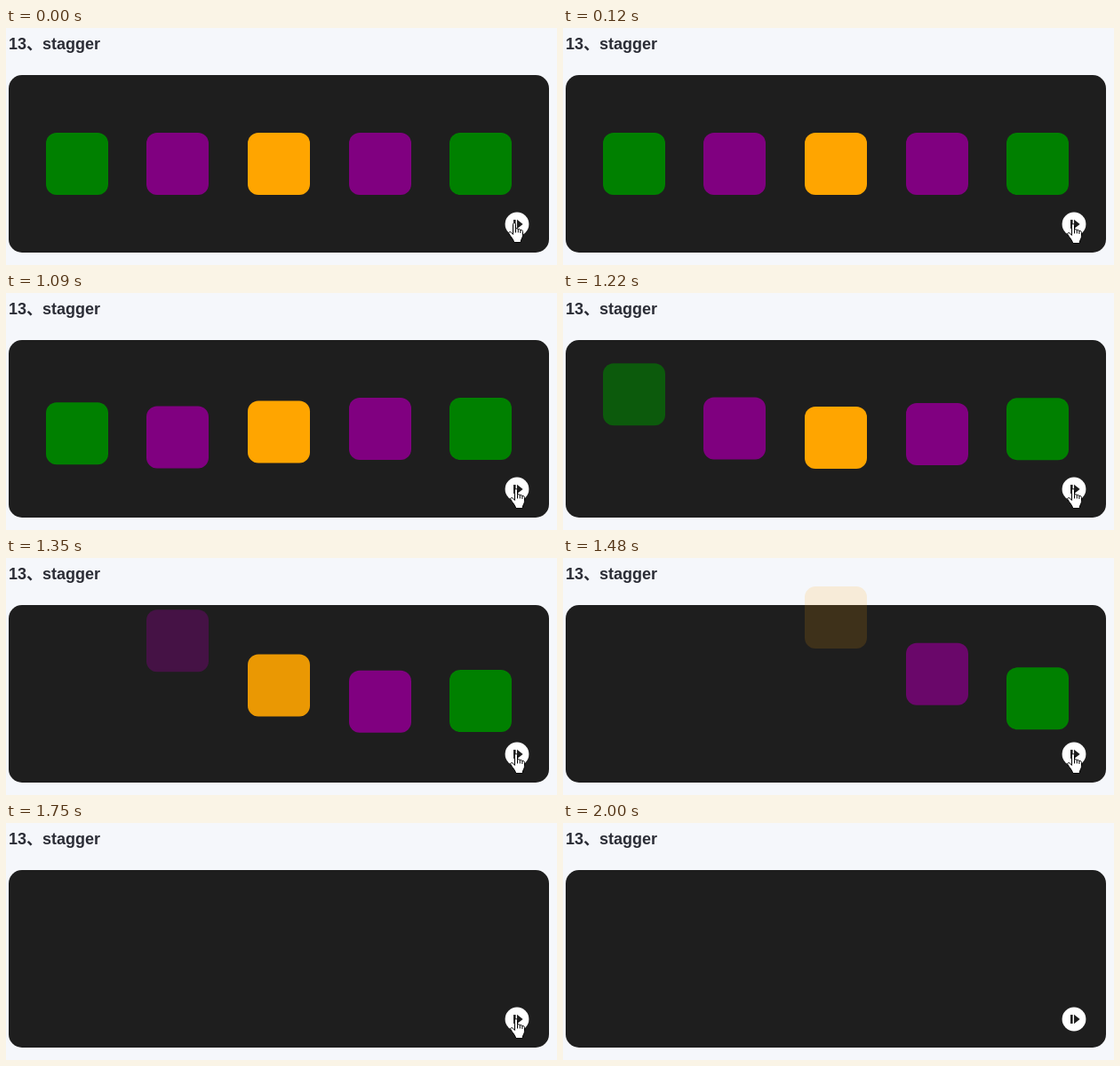
These frames come from a looping animation (620x267 px, 2680 ms). An HTML page:

```html
<!DOCTYPE html>
<html lang="en">
<head>
<meta charset="utf-8">
<title>stagger</title>
<style>
  html, body { margin: 0; width: 100%; height: 100%; overflow: hidden; background: #f5f7fb; }
  svg { display: block; }
  text { font: bold 18px "Liberation Sans", Arial, "Noto Sans CJK SC", "Noto Sans CJK", sans-serif; fill: #2b2d36; }
</style>
</head>
<body>
<svg width="620" height="267" viewBox="0 0 620 267">
  <rect width="620" height="267" fill="#f5f7fb"/>
  <text x="3" y="24">13、stagger</text>
  <rect x="3" y="53" width="608" height="200" rx="15" fill="#1e1e1e"/>
  <g id="boxes"></g>
  <g id="button">
    <circle cx="575" cy="221" r="13.4" fill="#fff"/>
    <path d="M571 216h2.6v10h-2.6zM575 215.8L581.6 221L575 226.2z" fill="#1e1e1e"/>
  </g>
  <g id="hand" stroke="#000" stroke-linejoin="round">
    <path fill="#fff" d="M5.5 13.5V2.2C5.5 .2 8.5 .2 8.5 2.2V7.5C8.9 6.3 11.1 6.5 11.3 8C11.9 7.1 13.7 7.4 13.9 9C14.5 8.2 16.5 8.5 16.5 10.5V14.5C16.5 17.5 14.4 18.5 14.2 22.5H6.7C6.3 19.5 3.2 16.5 .9 12.8C0 11 2.1 9.9 3.5 11.3Z"/>
    <path fill="none" d="M8.5 7.5V11.5M11.3 8V11.5M13.9 9V12"/>
  </g>
  <path id="arrow" d="M.5 .5V16.2L4.2 12.7L6.7 18.4L9 17.4L6.6 11.8H11.6Z" fill="#fff" stroke="#000"/>
</svg>
<script>
const LOOP = 2680;
const STEPS = [0, 120, 960, 1090, 1220, 1350, 1480, 1610, 1750, 1880, 2000];
const FIRST_MOVE = 2, LEAVE = 9;
const TICK = 400 / 3, LEAD = 151;          // sampled clock of the tween, ms
const DURATION = 500, STAGGER = 100, RISE = 100;
const COLORS = ["green", "purple", "orange", "purple", "green"];

const byId = id => document.getElementById(id);
const hand = byId("hand"), arrow = byId("arrow");

const boxes = COLORS.map((fill, i) => {
  const box = document.createElementNS("http://www.w3.org/2000/svg", "rect");
  const attrs = { x: Math.round(44.8 + 113.6 * i), y: 118, width: 70, height: 70, rx: 12, fill };
  for (const key in attrs) box.setAttribute(key, attrs[key]);
  return byId("boxes").appendChild(box);
});

const clamp = v => Math.min(1, Math.max(0, v));
const backIn = x => x * x * (2.70158 * x - 1.70158);

function place(el, x, y, shown) {
  el.setAttribute("transform", `translate(${x} ${y})`);
  el.setAttribute("visibility", shown ? "visible" : "hidden");
}

function render(ms) {
  const step = STEPS.filter(t => t <= ms).length - 1;
  const time = step < FIRST_MOVE ? 0 : LEAD + (step - FIRST_MOVE) * TICK;

  boxes.forEach((box, i) => {
    const p = backIn(clamp((time - i * STAGGER) / DURATION));
    box.setAttribute("y", 118 - RISE * p);
    box.setAttribute("opacity", clamp(1 - p));
  });

  place(hand, step ? 567 : 565, step ? 220 : 219, step < LEAVE);
  place(arrow, 581, 249, step === LEAVE);
}

const start = performance.now();
function frame() {
  render((performance.now() - start) % LOOP);
  requestAnimationFrame(frame);
}
frame();
</script>
</body>
</html>
```
